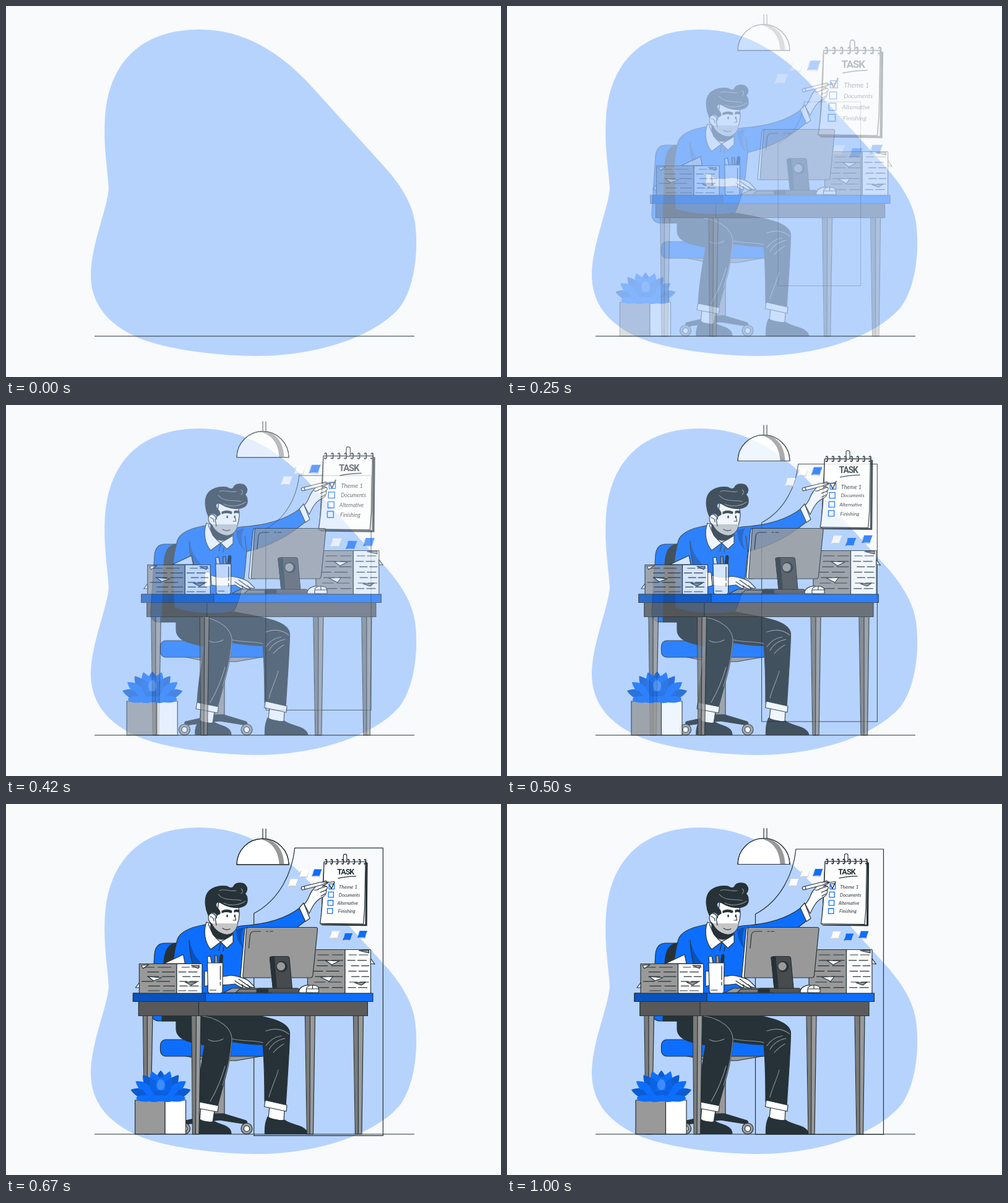
Write an HTML page that moves like this. It is 800 px wide and 600 px high and loops after 1040 ms.

```html
<!DOCTYPE html>
<html lang="en">
<head>
<meta charset="utf-8">
<title>Task desk</title>
<style>
html, body { margin: 0; width: 100%; height: 100%; overflow: hidden; background: #f8fafc; }
svg { display: block; width: 800px; height: 600px; }
.k { stroke: #263238; stroke-width: 1.2; stroke-linejoin: round; stroke-linecap: round; fill: none; }
.n { stroke: none; }
.w { fill: #fff; }
.b { fill: #0d6efd; }
.db { fill: #0a52bd; }
.d { fill: #263238; }
.g { fill: #999; }
.dg { fill: #7b7b7b; }
.lt { stroke: #8b9094; stroke-width: 1.1; fill: none; }
.head { font: bold 12.5px Roboto, "Open Sans", sans-serif; letter-spacing: -0.9px; text-anchor: middle; fill: #263238; stroke: none; }
.note { font: italic 7.3px Lato, "Open Sans", sans-serif; fill: #263238; stroke: none; }
</style>
</head>
<body>
<svg viewBox="0 0 800 600">
<path fill="#b6d3fe" d="M313 38C385 38 443 75 492 128L607 255C640 290 657 322 661 350C667 395 661 455 636 488C585 545 480 566 409 566C345 566 255 556 208 534C160 511 137 478 137 434C138 385 163 330 166 296C164 262 157 225 160 180C166 90 220 38 313 38Z"/>

<g id="door" class="k">
  <path d="M467 73H608.5V534.5H401.5V178C443 156 463 112 467 73Z"/>
</g>

<g id="lamp" class="k">
  <path d="M415 39.5V57M420 39.5V57"/>
  <path class="w" d="M373 97.5A42 42 0 0 1 457 97.5Z"/>
  <path class="g n" d="M410 56C431 60 441 78 441.5 97.5H449.5C449 78 440 59 419 55.8Z"/>
  <path d="M373 97.5A42 42 0 0 1 457 97.5Z"/>
</g>

<g id="board" class="k">
  <g id="notes"></g>
  <path class="d" d="M516 95H584.5L583.5 197L511 196Z"/>
  <path class="w" d="M514 93H582.5L581.5 195.5L509 195Z"/>
  <path class="w" d="M514 93H581.5L580 170L578 194.5L507.5 193.5C512 165 513 130 514 93Z"/>
  <rect class="w" x="545.5" y="80.5" width="5.5" height="13" rx="2.7"/>
  <path id="rings" stroke-width="1.7"/>
  <text class="head" x="549" y="113.5">TASK</text>
  <path d="M537 119.8Q550 117 566 116.6"/>
  <g stroke="#0d6efd" stroke-width="1.3">
    <rect x="522" y="129" width="8.6" height="8.6"/>
    <rect x="521" y="142.4" width="8.4" height="8.4"/>
    <rect x="520.3" y="155.8" width="8.4" height="8.4"/>
    <rect x="519.5" y="169" width="8.4" height="8.4"/>
  </g>
  <path stroke-width="1.5" d="M523 131L525.8 137L531 126"/>
  <text class="note" x="538" y="137" style="font-size:8.4px">Theme 1</text>
  <text class="note" x="538" y="149.5">Documents</text>
  <text class="note" x="536" y="163">Alternative</text>
  <text class="note" x="537" y="176.3" style="font-size:7.6px">Finishing</text>
</g>

<g id="man" class="k">
  <!-- chair -->
  <path class="b" d="M257 225H290V351H249C238 351 233 344 234 334L240 243C241 231 246 225 257 225Z"/>
  <path class="d" d="M274 225C260 227 255 242 255 262L252 351H290V225Z"/>
  <path class="g" d="M287 407H418L372 415H326Z"/>
  <rect class="g" x="337" y="413" width="16" height="88"/>
  <path class="d" d="M340 501H352L388 512Q391 515 389 518L345 511L291 518Q287 515 290 512Z"/>
  <g class="g">
    <circle cx="288.5" cy="525" r="9"/><circle cx="389" cy="525" r="9"/>
  </g>
  <g class="w">
    <circle cx="288.5" cy="525" r="4.5"/><circle cx="389" cy="525" r="4.5"/>
  </g>
  <rect class="b" x="249.5" y="381" width="190" height="27" rx="9"/>
  <!-- legs -->
  <path class="w" d="M426 489L450 494L449 513L424 508ZM315 490L337 495L334 515L313 512Z"/>
  <path class="d" d="M423 506C431 511 441 513 450 511C460 520 484 518 488 533.5H418.5C418 522 420 512 423 506ZM313 510C320 515 330 516 336 513C344 519 364 519 364 533.5H306C305 524 308 515 313 510Z"/>
  <path class="d" d="M320 335H372C410 343 458 348 458.5 371C458 400 455 440 452 489L418 481C418 440 417 410 415 389C395 390 375 385 350 383Z"/>
  <path class="d" d="M275 325H330C350 345 366 360 365.5 382C362 425 350 455 342 489L309 483C310 450 316 420 321 390C295 386 274 380 275 362Z"/>
  <g class="lt">
    <path d="M318 343C345 347 366 362 365 383C362 420 354 440 350 455M366 380C385 384 402 382 415 386M330 481C341 462 349 442 354 424M327 381C334 385 343 384 351 380M420 367C434 362 447 364 457 372M420 391C426 382 434 377 445 375M425 397C431 386 441 381 451 379M432 402C438 395 444 391 449 388M425 474C430 455 437 443 440 430"/>
  </g>
  <path class="w" d="M308.5 481L343.5 488L342 498L307 491.5ZM419 479L454 487L453 497L417.5 489.5Z"/>
  <!-- jumper -->
  <path class="b" d="M322 195C299 199 281 207 277 219C271 240 269 258 270 275L272 328C300 338 340 339 368 334C375 322 384 290 386 270L389 237C428 228 456 212 484 189L476 167C452 186 418 195 380 197L367 200Z"/>
  <path class="db n" d="M297 221C296 238 300 250 302 262L316 258C305 246 299 235 297 221ZM372 203L385 199C379 210 379 224 386 236C377 228 372 216 372 203Z"/>
  <path d="M296 220C296 236 299 249 302 262M389 238L386 212M347 225L344 237M352 231L351 238"/>
  <path class="w" d="M321 270L330 271L332 292L321 295Z"/>
  <path class="w" d="M331 275C346 281 355 279 363 277C374 278 387 282 392 286L402 296C398 298 394 296 390 292L395 298C389 298 385 296 381 292L383 297C377 297 374 293 370 291C356 293 344 294 332 291Z"/>
  <path d="M376 283L390 293M370 286L382 294"/>
  <!-- neck and collar -->
  <path class="w" d="M324 191C332 194 362 202 367 210L367 224L357 233L347 223L331 235C322 225 318 207 324 191Z"/>
  <path class="d" d="M331 192C329 213 342 222 355 218C362 215 366 211 367 206L350 208Z"/>
  <path d="M327 194C333 210 340 219 347 223L367 211"/>
  <!-- head -->
  <path class="w" d="M344 158L374 165C379 172 377 186 374 194C373 203 366 211 357 211C347 210 337 204 333 194C326 190 325 180 331 177C336 176 339 180 340 185Z"/>
  <path class="n" fill="#c6c6c6" d="M333 193H374C373 203 366 210.400 357 210.400C347 209 337 203 333 193Z"/>
  <path d="M330 182Q336 183 336 189M338 184L340 196M370 179L371.500 188L367 188"/>
  <path d="M350 201Q356 205 362 202"/>
  <path class="d" d="M349 173Q357 169 365 173L364 176Q356 173 349 176ZM369 172Q373 170 376 172V175Q372 173 369 175Z"/>
  <ellipse class="d n" cx="357.500" cy="181" rx="1.300" ry="2.200"/><ellipse class="d n" cx="369.500" cy="181" rx="1.100" ry="2"/>
  <path class="d" d="M327 180C322 169 320 154 325 145C330 136 343 131 357 133C361 136 366 137 368 133C370 127 383 126 387 131C391 136 390 141 386 145C391 149 392 160 386 164C378 170 360 168 349 161C344 157 339 159 339 163C340 169 347 171 346 177L341 180C338 174 331 174 327 180Z"/>
  <g class="lt">
    <path d="M345 140C352 136 361 142 372 140M343 146C353 158 369 153 380 156M352 160C364 166 379 163 387 157M380 137Q385 141 380 145"/>
  </g>
  <!-- raised hand -->
  <path class="w" d="M474 168L481 160L491 185L484 190Z"/>
  <path class="w" d="M482 162C489 156 490 146 495 140C500 132 509 126 517 124L520 128L511 133C518 131 522 135 517 139C519 144 516 149 509 152C500 157 495 166 490 177Z"/>
  <path d="M506 137L518 133M508 143L518 139M509 149L516 145M498 139Q503 140 506 137"/>
  <path class="w" d="M478 134L508 126.500L521 126L510 131L479 139Q476 137 478 134Z"/>
  <path d="M482 133L483 138M520 127L530 125.500"/>
</g>

<g id="desk" class="k">
  <g class="g">
    <path d="M222 342.500H237.500L234 534H224.500ZM300.500 342.500H315.500L312.500 534H302ZM484 342.500H500L497 534H487ZM562 342.500H578L575.500 534H565Z"/>
    <path class="dg n" d="M222.600 343H229L229 533.500H225ZM301 343H308L307 533.500H302.500ZM484.600 343H492L491.500 533.500H487.500ZM562.600 343H570L570 533.500H565.500Z"/>
    <path fill="none" d="M229 342.500V534M308 342.500L307 534M492 342.500L491.500 534M570 342.500V534"/>
  </g>
  <rect x="215" y="319" width="370" height="23.500" fill="#5b5b5b"/>
  <rect x="215" y="319" width="97" height="23.500" fill="#585858"/>
  <rect class="b" x="206" y="306" width="387.500" height="13.500"/>
  <rect class="db" x="206" y="306" width="117" height="13.500"/>

  <rect class="g" x="488" y="235.500" width="60.500" height="70.500"/>
  <rect class="w" x="548.500" y="235.500" width="41.500" height="70.500"/>
  <path id="tall"/>
  <path class="w" d="M517 253L539 254L527 260ZM509 280L529 279L523 287ZM590 250L596.500 259L590 258Z"/>
  <path class="g" d="M564 289L582 288L575 293ZM571 237L587 236V241Z"/>

  <path class="w" d="M256 258L287 243.500L290 258Z"/>
  <rect class="g" x="216" y="258.500" width="60.500" height="47.500"/>
  <rect class="w" x="276.500" y="258.500" width="41" height="47.500"/>
  <path id="low"/>
  <path class="w" d="M219 261L231 260L222 266ZM230 279L252 281L239 286ZM216 289L210 297L216 297Z"/>
  <path class="g" d="M290 288L309 288L300 293ZM300 261L313 261L311 266Z"/>

  <path class="w" d="M327 258L326 247L331 246L333 258Z"/>
  <path class="g" d="M338 258V245H342L343 258Z"/>
  <path class="d" d="M345 258L347 244Q351 242 351 247L350 258Z"/>
  <path class="w" d="M326 257H351L350.500 303Q350 306 347 306H330Q327 306 327 303Z"/>
  <path d="M347 262V284M347 288V293M330 301H340"/>

  <path class="w" d="M390 199.500Q387 199.500 386.500 203L379.500 278Q379.500 281 382 281H390V199.500Z"/>
  <path class="g" d="M392 199.500H501Q504.500 199.500 504 203L496.500 277Q496 281 492 281H386Q383 281 383.500 277L389 203Q389 199.500 392 199.500Z"/>
  <path d="M393 233L395 212Q396 206 402 206H412M421 206H424M427 206H432"/>
  <path class="g" d="M352 305L366 298H430V305Z"/>
  <path class="dg" d="M378 299.500H406V305H372Z"/>
  <path fill="#555" d="M424 298H472Q476 299 476 305H406L409 298Z"/>
  <path class="d" d="M406 299H424V305H406Z"/>
  <path fill="#484b4d" d="M431 246.500H456Q458 247 458.500 249L463 298H432L427 249Q427 247 431 246.500Z"/>
  <path class="d" d="M427 248L434 247L438 298H432Z"/>
  <circle class="d" cx="446.500" cy="263" r="8.300"/><circle class="g" cx="445" cy="262.500" r="7.300"/>
  <path class="w" d="M474 304C474 296 484 292 492 293L496 305H474Z"/>
  <path class="w" d="M486 305V299Q487 293 496 293Q506 293 506 300V305Z"/>
  <path d="M487 299H506M496 293V299"/>
</g>

<g id="plant">
  <g class="k">
    <rect class="g" x="208" y="479" width="48.500" height="55"/>
    <rect class="w" x="256.500" y="479" width="33.500" height="55"/>
  </g>
  <g id="leaves"></g>
  <g class="b">
    <ellipse cx="224" cy="476" rx="14" ry="5.500"/><ellipse cx="275" cy="476" rx="14" ry="5.500"/>
    <ellipse cx="239" cy="478" rx="11" ry="4"/><ellipse cx="260" cy="478" rx="11" ry="4"/>
  </g>
  <ellipse cx="249.500" cy="468" rx="12" ry="5" fill="#0b5fdf"/>
  <ellipse cx="249.500" cy="476" rx="13" ry="5" class="b"/>
</g>

<path class="k" d="M143.500 534H659.500"/>
</svg>
<script>
const $ = id => document.getElementById(id);

// printed edges of a paper stack: broken lines in rows
function rows(x0, x1, y0, y1, step, seed) {
  let d = "";
  for (let y = y0; y < y1; y += step) {
    seed = (seed * 37 + 11) % 101;
    const w = x1 - x0, a = x0 + w * (0.06 + seed / 500);
    const b = a + w * 0.3, c = b + w * 0.1;
    d += `M${a} ${y}H${b}M${c} ${y}H${Math.min(x1 - 3, c + w * 0.35)}`;
  }
  return d;
}
$("tall").setAttribute("d", rows(490, 548, 244, 304, 8.8, 5) + rows(549, 590, 244, 304, 8.8, 9));
$("low").setAttribute("d", rows(216, 276, 264, 304, 7.6, 3) + rows(277, 317, 264, 304, 7.6, 7));

let rings = "";
for (let i = 0; i < 8; i++) rings += `M${516 + i * 9.1} 90q1.500 -2 2.300 0v5.500q-1 2 -2.600 0.500`;
$("rings").setAttribute("d", rings);

const sticky = (x, y, c) => `<g class="n" transform="translate(${x} ${y})">
  <path fill="#c9ced6" d="M-6 -4L8 -5L5 7L-8 6Z"/>
  <path fill="${c}" d="M-4 -6H8.500Q6 -1 4.500 5Q-3 4 -8 5.500Q-5 1 -4 -6Z"/></g>`;
const blue = "#0d6efd", deep = "#0b5bd2", white = "#fff";
$("notes").innerHTML = sticky(481.5, 112, white) + sticky(502, 111, blue) + sticky(463, 127, white) +
  sticky(531, 212, white) + sticky(552, 215.5, blue) + sticky(576, 211.5, blue);

const leaf = (deg, len, w, c) => `<path fill="${c}" transform="translate(249.500 477) rotate(${deg})"
  d="M0 0C${-w} ${-len * 0.35} ${-w} ${-len * 0.75} 0 ${-len}C${w} ${-len * 0.75} ${w} ${-len * 0.35} 0 0Z"/>`;
// a row of n leaves fanned evenly, outer ones drawn first
function fan(n, gap, len, grow, w, a, b) {
  let s = "";
  for (let i = (n - 1) / 2; i >= 0; i--) {
    const c = Math.floor(i) % 2 ? a : b, l = len + i * grow;
    s += leaf(-i * gap, l, w, c) + leaf(i * gap, l, w, c);
  }
  return s;
}
$("leaves").innerHTML = fan(9, 18.3, 46, 1.2, 11, blue, deep) + fan(8, 21, 40, 1.5, 9.5, deep, blue) +
  fan(5, 27, 36, 1, 10, "#0b62e3", blue) + '<ellipse cx="249.500" cy="454" rx="6.500" ry="9" fill="#3e8bfd"/>';

// cubic-bezier(.36, -.01, .5, 1.38)
function ease(x) {
  if (x >= 1) return 1;
  const at = (s, a, b) => 3 * (1 - s) * s * ((1 - s) * a + s * b) + s * s * s;
  let lo = 0, hi = 1;
  for (let i = 0; i < 24; i++) {
    const m = (lo + hi) / 2;
    if (at(m, 0.36, 0.5) < x) lo = m; else hi = m;
  }
  return at(lo, -0.01, 1.38);
}

const zoom = (x, y, k) => `translate(${x} ${y}) scale(${k}) translate(${-x} ${-y})`;

function draw() {
  const t = performance.now() % 1040;
  const step = Math.floor((t + 4) * 0.024);
  const y = step < 2 ? 0 : ease((step + 0.8) / 24);
  const off = 36 * (1 - y);
  const moves = {
    door: zoom(504.8, 303.8, 0.5 + 0.5 * y),
    lamp: `translate(0 ${-off})`,
    board: zoom(520.3, 152, 1.5 - 0.5 * y),
    man: "",
    desk: `translate(${off} 0)`,
    plant: `translate(${-off} 0)`
  };
  for (const id in moves) {
    $(id).setAttribute("transform", moves[id]);
    $(id).setAttribute("opacity", Math.max(0, Math.min(1, y)));
  }
  requestAnimationFrame(draw);
}
draw();
</script>
</body>
</html>
```
